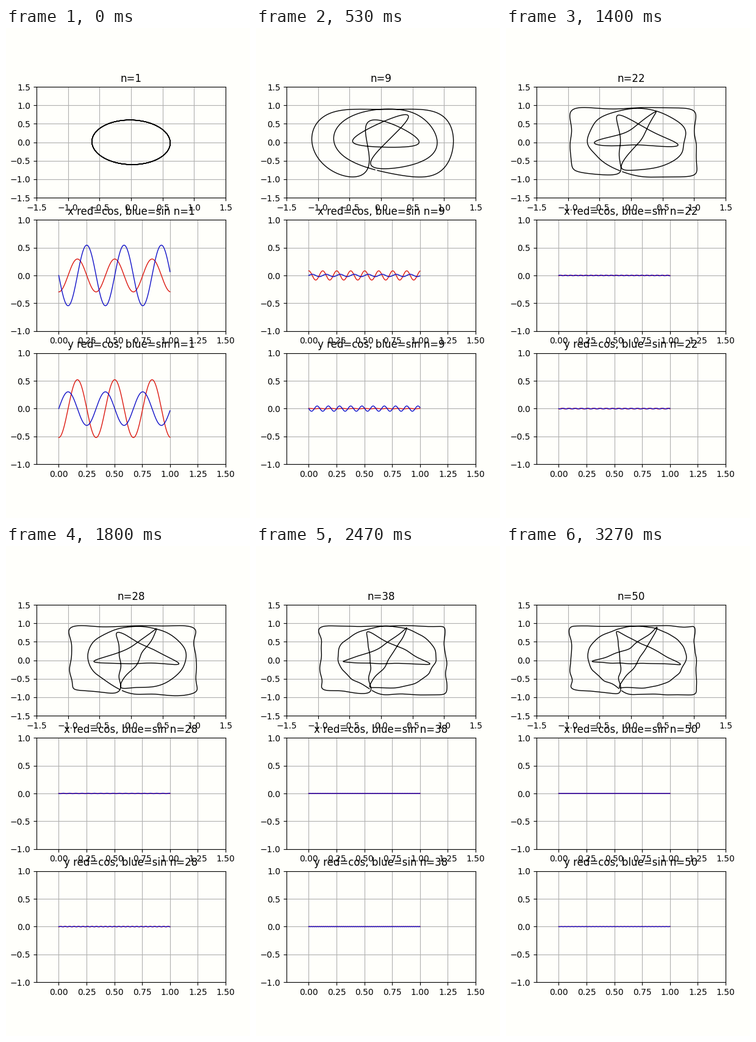
Write a matplotlib script that moves like this. It is 400 px wide and 800 px high and loops after 3.34 s.

```python
import numpy as np
import matplotlib.pyplot as plt
from matplotlib.animation import FuncAnimation

TERMS = 50
LOOP_MS = 3340
TICK_MS = 20
TERM_MS = 66.67
SAMPLES = 1000
WAVE_SPAN = 149 / 150   # waves stop one sample short of the period
CURVE_SPAN = 0.998
PAPER = "#fffffb"

STAR = [(-0.22, -0.77), (0.12, 0.0), (0.43, 0.9), (0.03, 0.36),
        (-0.39, 0.06), (-0.65, -0.05), (0.8, -0.12), (0.19, 0.44),
        (-0.24, 0.79), (-0.16, -0.05), (-0.18, -0.91)]
BOX = [(-0.18, -0.91), (-0.94, -0.79), (-0.96, 0.92), (1.01, 0.92),
       (1.03, -0.94), (-0.18, -0.91)]


def oval():
    """One clockwise turn from the lower left."""
    angle = np.radians(-114) - np.linspace(0, 2 * np.pi, 80)
    return np.column_stack([0.097 + 0.774 * np.cos(angle),
                            0.085 + 0.836 * np.sin(angle)])


def resample(points, share):
    """Walk a stroke at even speed for its share of the period."""
    points = np.array(points)
    steps = np.hypot(*np.diff(points, axis=0).T)
    dist = np.concatenate([[0], np.cumsum(steps)])
    s = np.linspace(0, dist[-1], round(share * SAMPLES), endpoint=False)
    return np.column_stack([np.interp(s, dist, c) for c in points.T])


def tremor(size=0.012, knots=90):
    """Small unsteadiness of a hand-drawn line."""
    rng = np.random.default_rng(3)
    at = np.linspace(0, 1, knots)
    return np.column_stack([np.interp(t, at, rng.normal(0, size, knots))
                            for _ in range(2)])


def ranked_waves(values, span):
    """Cosine and sine parts of the strongest harmonics, largest first."""
    coef = np.fft.rfft(values) / len(values)
    order = np.argsort(-np.abs(coef))[:TERMS]
    scale = np.where(order == 0, 1, 2)
    phase = 2 * np.pi * span * np.outer(order, t)
    cos_part = (scale * coef[order].real)[:, None] * np.cos(phase)
    sin_part = (-scale * coef[order].imag)[:, None] * np.sin(phase)
    return cos_part, sin_part


t = np.linspace(0, 1, SAMPLES)
strokes = [(oval(), 0.295), (STAR, 0.365), (BOX, 0.34)]
path = np.vstack([resample(*s) for s in strokes]) + tremor()
waves = [ranked_waves(c, WAVE_SPAN) for c in path.T]
sums = [np.cumsum(sum(ranked_waves(c, CURVE_SPAN)), axis=0) for c in path.T]

fig, axes = plt.subplots(3, 1, figsize=(4, 8), dpi=100, facecolor=PAPER)
fig.subplots_adjust(left=0.125, right=0.9, bottom=0.11, top=0.88, hspace=0.2)

top = axes[0]
top.set(xlim=(-1.5, 1.5), ylim=(-1.5, 1.5),
        xticks=np.linspace(-1.5, 1.5, 7), yticks=np.linspace(-1.5, 1.5, 7))
for ax in axes[1:]:
    ax.set(xlim=(-0.2, 1.5), ylim=(-1, 1),
           xticks=np.linspace(0, 1.5, 7), yticks=np.linspace(-1, 1, 5))
for ax in axes:
    ax.set_facecolor(PAPER)
    ax.grid(True)

curve, = top.plot([], [], color="black", lw=1)
pairs = [[ax.plot([], [], color=color, lw=1)[0]
          for color in ("#dc1810", "#1010c8")] for ax in axes[1:]]


def update(tick):
    i = min(int((tick * TICK_MS + 15) / TERM_MS), TERMS - 1)
    n = i + 1
    curve.set_data(sums[0][i], sums[1][i])
    top.set_title(f"n={n}")
    for name, ax, lines, parts in zip("xy", axes[1:], pairs, waves):
        for line, part in zip(lines, parts):
            line.set_data(t, part[i])
        ax.set_title(f"{name} red=cos, blue=sin n={n}")


anim = FuncAnimation(fig, update, frames=LOOP_MS // TICK_MS, interval=TICK_MS,
                     init_func=lambda: update(0), repeat=True, repeat_delay=0)
plt.show()
```
